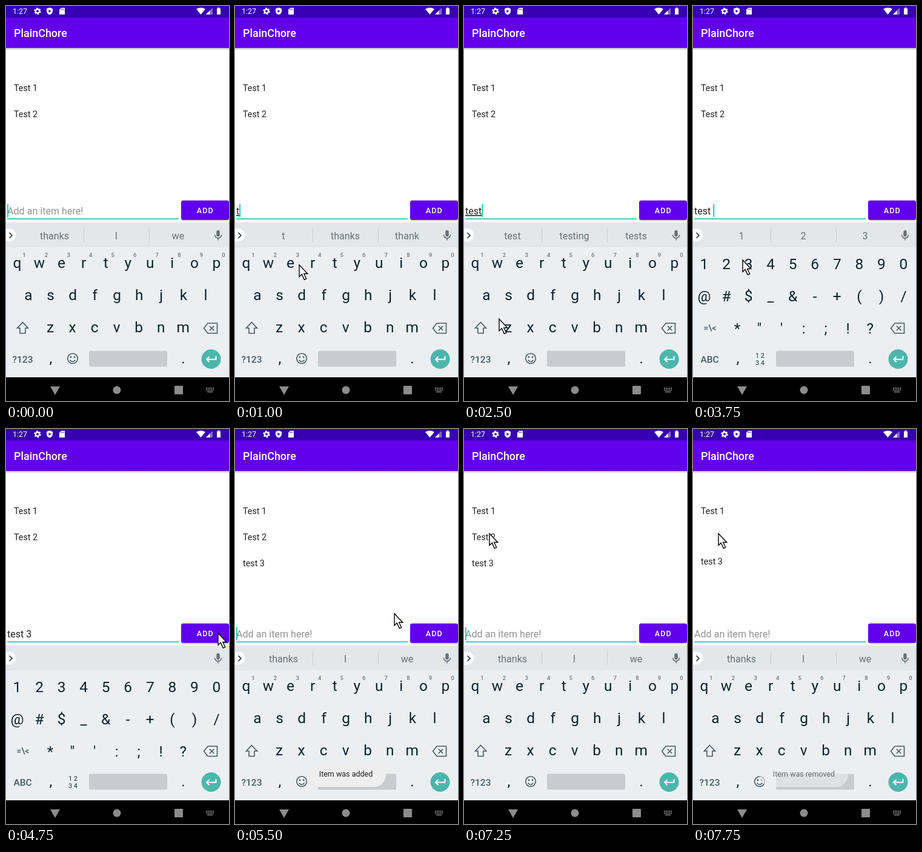
Animation of 368x650 px, one loop 8 s. Source, as an HTML page:

```html
<!DOCTYPE html>
<html lang="en">
<head>
<meta charset="utf-8">
<style>
html, body { margin: 0; width: 100%; height: 100%; overflow: hidden; background: #fff; }
svg { display: block; width: 368px; height: 650px; font-family: Roboto, sans-serif; }
text { white-space: pre; }
.mid text, text.mid { text-anchor: middle; }
.key { font-size: 24.5px; fill: #0c242e; }
.hint { font-size: 9.5px; font-weight: 500; fill: #6b777d; }
.mode { font-size: 15.5px; font-weight: 500; fill: #455a64; }
.item { font-size: 14.3px; fill: #212121; }
.field { font-size: 16.1px; }
.word { font-size: 16.1px; fill: #667278; }
.line { fill: none; stroke: #455a64; stroke-width: 1.6; }
</style>
</head>
<body>
<svg viewBox="0 0 368 650">
  <defs>
    <linearGradient id="shade" x2="0" y2="1">
      <stop stop-color="#000" stop-opacity=".28"/><stop offset="1" stop-color="#000" stop-opacity="0"/>
    </linearGradient>
  </defs>
  <rect width="368" height="650" fill="#fff"/>

  <rect y="69" width="368" height="4" fill="url(#shade)"/>
  <rect width="368" height="69" fill="#6200ee"/>
  <rect width="368" height="19" fill="#3700b3"/>
  <g fill="#fff">
    <text x="11" y="13.3" font-size="12.5">1:27</text>
    <circle cx="52" cy="8.5" r="3.2" fill="none" stroke="#fff" stroke-width="2.4"/>
    <circle cx="52" cy="8.5" r="5" fill="none" stroke="#fff" stroke-width="1.6" stroke-dasharray="2.6 2.636"/>
    <path d="M72 2.5l5 2v4q0 4-5 6q-5-2-5-6v-4z"/>
    <path d="M70.5 6v5l4-2.5z" fill="#3700b3"/>
    <path d="M91 3h6v11h-9V6z"/>
    <path d="M91 4.5v2M93 4.5v2M95 4.5v2" stroke="#3700b3"/>
    <path d="M314 5q7.500-4.500 15 0l-7.500 9z"/>
    <path d="M341 3v11h-11z" opacity=".4"/>
    <path d="M336.500 7.500v6.500h-6.500z"/>
    <path d="M349.500 2.500h3v1.500h1.500v10h-6v-10h1.500z"/>
    <text x="13" y="51" font-size="17.9" font-weight="500">PlainChore</text>
  </g>

  <g class="item">
    <text x="13" y="139.500">Test 1</text>
    <text id="second" x="13" y="182.500">Test 2</text>
    <text id="third" x="13">test 3</text>
  </g>

  <text id="prompt" class="field" x="2" y="343" fill="#929292">Add an item here!</text>
  <text id="typed" class="field" x="2" y="343" fill="#202020"></text>
  <rect x="2" y="349.500" width="283" height="1.700" fill="#12c4b2"/>
  <rect id="caret" y="326" width="1.800" height="21.500" fill="#12c4b2"/>
  <rect x="289" y="321" width="79" height="33" rx="4" fill="#000" opacity=".18"/>
  <rect x="289" y="320" width="79" height="32" rx="3.500" fill="#6200ee"/>
  <text class="mid" x="328.700" y="341" font-size="12.500" font-weight="500" letter-spacing="1.100" fill="#fff">ADD</text>

  <rect y="355" width="368" height="256" fill="#eceff1"/>
  <rect y="357" width="368" height="40" fill="#e3e7e9"/>
  <path d="M0 366.500h6a10.500 10.500 0 0 1 0 21h-6z" fill="#fff"/>
  <path class="line" d="M5.500 373l4.500 4.500l-4.500 4.500" style="stroke:#263238"/>
  <path id="dividers" d="M128.500 366v22M236.500 366v22" stroke="#c6ccd0"/>
  <g class="mid">
    <text class="word" x="80" y="383.500"></text>
    <text class="word" x="182" y="383.500"></text>
    <text class="word" x="284" y="383.500"></text>
  </g>
  <rect x="347.300" y="369" width="5.400" height="10.500" rx="2.700" fill="#667278"/>
  <path class="line" d="M344.500 376.500a5.500 5.500 0 0 0 11 0M350 382v3.500" style="stroke:#667278"/>

  <g id="letters" class="mid">
    <path class="line" d="M27.500 520.500l9 9.500h-4.500v8.500h-9V530h-4.500z"/>
    <circle class="line" cx="110" cy="580" r="8.300"/>
    <path class="line" d="M105.500 582.500q4.500 5.500 9 0"/>
    <path d="M105.800 576.500h2.400v2.400h-2.400zM111.800 576.500h2.400v2.400h-2.400z" fill="#455a64"/>
    <text class="mode" x="27.500" y="586.500">?123</text>
  </g>
  <g id="symbols" class="mid">
    <text class="mode" x="28" y="535" font-weight="400" style="font-size:14px">=\&lt;</text>
    <text class="mode" x="27.500" y="586.500">ABC</text>
    <text class="mode" x="110.500" y="579" style="font-size:11px">1 2</text>
    <text class="mode" x="110.500" y="591" style="font-size:11px">3 4</text>
  </g>
  <g class="mid key"><text x="74" y="588">,</text><text x="292.500" y="588">.</text></g>
  <path class="line" d="M333 522h15.500v16.500h-15.500l-6.500-8.250zM335.800 526.500l7.500 7.500M343.300 526.500l-7.500 7.500"/>
  <rect x="137" y="567.500" width="129" height="26" rx="2.500" fill="#c8ccd0"/>
  <circle cx="338.500" cy="581" r="16" fill="#4db6ac"/>
  <path class="line" d="M346.500 576v5.500h-15M335.500 577l-4.500 4.500l4.500 4.500" style="stroke:#fff;stroke-width:1.900"/>

  <rect y="611" width="368" height="39"/>
  <g fill="#8c8c8c">
    <path d="M73 626h16l-8 14z"/>
    <circle cx="183" cy="632" r="6.500"/>
    <rect x="278" y="625" width="14" height="14" rx="1"/>
    <path d="M330 629h13M330 632h13" stroke="#8c8c8c" stroke-width="1.800" stroke-dasharray="1.700 1.100"/>
    <path d="M332 635h9" stroke="#8c8c8c" stroke-width="1.500"/>
  </g>

  <g id="toast" class="mid">
    <rect y="548" height="41" rx="20" fill="#eee"/>
    <text x="183" y="572" font-size="12.500" fill="#202020"></text>
  </g>
  <path id="pointer" d="M0 0v19.500l4.300-4l4 8.800l3.400-1.500l-4-8.300h6z" fill="#fff" stroke="#000" stroke-width="1.400"/>
</svg>
<script>
const $ = id => document.getElementById(id);
const words = [...document.querySelectorAll('.word')];
const show = (el, on) => el.style.visibility = on ? 'visible' : 'hidden';

function addText(parent, cls, x, y, content) {
  const el = document.createElementNS('http://www.w3.org/2000/svg', 'text');
  el.setAttribute('class', cls);
  el.setAttribute('x', x);
  el.setAttribute('y', y);
  el.textContent = content;
  parent.append(el);
}

function addRow(parent, chars, x, y, cls = 'key') {
  [...chars].forEach((c, i) => addText(parent, cls, x + i * 36.55, y, c));
}

addRow($('letters'), 'qwertyuiop', 18.5, 431);
addRow($('letters'), '1234567890', 30, 413, 'hint');
addRow($('letters'), 'asdfghjkl', 37, 484);
addRow($('letters'), 'zxcvbnm', 73, 537);
addRow($('symbols'), '1234567890', 18.5, 433);
addRow($('symbols'), '@#$_&-+()/', 18.5, 486);
addRow($('symbols'), '*"\':;!?', 73, 538.5);

// Each edit: time, field text, suggestions
const edits = [
  [0, '', 'thanks I we'],
  [750, 't', 't thanks thank'],
  [1250, 'te', 'te the tea'],
  [1750, 'tes', 'tes test yes'],
  [2250, 'test', 'test testing tests'],
  [3500, 'test ', '1 2 3'],
  [4000, 'test 3', ''],
  [5250, '', 'thanks I we']
];

// Pointer path: time, x, y
const path = [
  [250, 186, 614], [500, 164, 428], [750, 160, 424], [1000, 106, 426], [1250, 92, 425],
  [1500, 76, 472], [1750, 72, 474], [2250, 163, 424], [2500, 58, 515], [2750, 27, 578],
  [3000, 27, 582], [3500, 160, 578], [3750, 82, 418], [4000, 85, 418], [4750, 350, 336],
  [5250, 342, 334], [6250, 26, 213], [6750, 42, 172], [8000, 42, 172]
];

function pointerAt(t) {
  const n = Math.max(1, path.findIndex(p => p[0] >= t));
  const [a, b] = [path[n - 1], path[n]];
  const k = (t - a[0]) / (b[0] - a[0]);
  return [a[1] + (b[1] - a[1]) * k, a[2] + (b[2] - a[2]) * k];
}

function drawToast(t) {
  const removed = t >= 7750;
  const [label, width] = removed ? ['Item was removed', 146] : ['Item was added', 132];
  const [box, text] = $('toast').children;
  box.setAttribute('x', 183 - width / 2);
  box.setAttribute('width', width);
  text.textContent = label;
  $('toast').style.opacity = removed ? 0.6 : t >= 5500 && t < 7250 ? 1 : 0;
}

function draw(t) {
  const [since, value, hints] = edits.findLast(e => e[0] <= t);
  const typed = $('typed');
  typed.textContent = value;
  typed.style.textDecoration = /^\w+$/.test(value) ? 'underline' : 'none';
  show($('prompt'), !value);
  $('caret').setAttribute('x', 2 + (value ? typed.getComputedTextLength() : 0));
  show($('caret'), Math.floor((t - since) / 500) % 2 === 0);

  const list = hints.split(' ');
  words.forEach((w, i) => w.textContent = list[i] || '');
  show($('dividers'), hints);

  const symbols = t >= 3000 && t < 5250;
  show($('symbols'), symbols);
  show($('letters'), !symbols);

  show($('second'), t < 7750);
  show($('third'), t >= 5500);
  $('third').setAttribute('y', t < 7750 ? 225.5 : 223);
  drawToast(t);

  show($('pointer'), t >= 250);
  if (t >= 250) $('pointer').setAttribute('transform', `translate(${pointerAt(t)})`);
}

function tick() {
  draw(Math.floor(performance.now() % 8000 / 250) * 250);
  requestAnimationFrame(tick);
}
tick();
</script>
</body>
</html>
```
